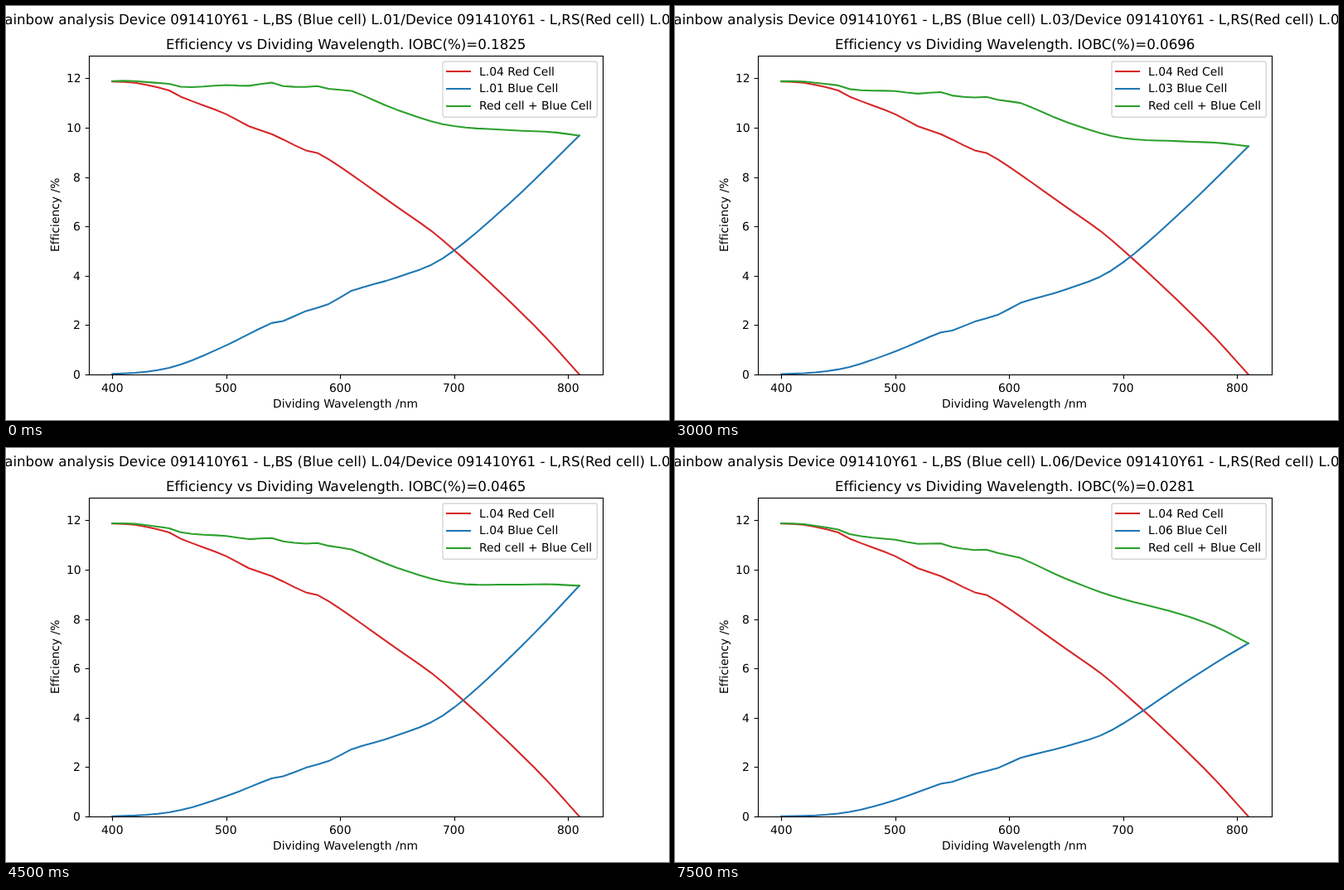
An HTML page with a canvas that plays this animation: 800x500 px, repeating every 8000 ms.

```html
<!DOCTYPE html>
<html lang="en">
<head>
<meta charset="utf-8">
<title>Efficiency vs Dividing Wavelength</title>
<style>
  html, body { margin: 0; width: 100%; height: 100%; overflow: hidden; background: #fff; }
  canvas { display: block; width: 800px; height: 500px; }
</style>
</head>
<body>
<canvas id="chart" width="800" height="500"></canvas>
<script>
const ctx = document.getElementById('chart').getContext('2d');
const LOOP = 8000, HOLD = 1500;
const AXES = { left: 100, right: 720, top: 60, bottom: 445 };
const RED = '#d62728', BLUE = '#1f77b4', GREEN = '#2ca02c';
const SMALL = 13.889, LARGE = 16.667;

// Wavelengths that are plotted, in nm.
const waves = Array.from({ length: 42 }, (_, i) => 400 + i * 10);

// Smooth curve through [x, y] points: cubic Hermite with secant slopes.
function spline(points) {
  const slopes = points.map((_, i) => {
    const [x0, y0] = points[Math.max(i - 1, 0)];
    const [x1, y1] = points[Math.min(i + 1, points.length - 1)];
    return (y1 - y0) / (x1 - x0);
  });
  return x => {
    const next = points.findIndex(p => p[0] >= x);
    const i = Math.max(next - 1, 0);
    const [x0, y0] = points[i], [x1, y1] = points[i + 1];
    const h = x1 - x0, k = (x - x0) / h, r = 1 - k;
    return y0 * r * r * (1 + 2 * k) + y1 * k * k * (1 + 2 * r)
      + h * k * r * (slopes[i] * r - slopes[i + 1] * k);
  };
}

// Efficiency in % at the bends of the red curve.
const redAt = spline([
  [400, 11.87], [420, 11.82], [450, 11.51], [460, 11.26], [500, 10.55], [520, 10.06],
  [540, 9.74], [570, 9.08], [580, 8.98], [600, 8.42], [650, 6.79], [680, 5.82],
  [700, 5.04], [740, 3.35], [780, 1.53], [810, 0]
]);

// Bends of the first blue cell; the others are scaled from it.
const blueAt = spline([
  [400, 0.02], [430, 0.11], [460, 0.4], [500, 1.18], [540, 2.085], [550, 2.165],
  [570, 2.57], [590, 2.855], [610, 3.39], [620, 3.535], [650, 3.935], [690, 4.7],
  [750, 6.99], [810, 9.68]
]);

const ratioWaves = [400, 530, 690, 750, 810];
const cells = [
  { iobc: '0.1825', ratios: [1, 1, 1, 1, 1] },
  { iobc: '0.1710', ratios: [0.91, 0.935, 0.969, 0.975, 0.981] },
  { iobc: '0.0696', ratios: [0.72, 0.811, 0.898, 0.936, 0.955] },
  { iobc: '0.0465', ratios: [0.56, 0.73, 0.869, 0.928, 0.966] },
  { iobc: '0.0443', ratios: [0.42, 0.685, 0.853, 0.927, 0.96] },
  { iobc: '0.0281', ratios: [0.3, 0.62, 0.744, 0.758, 0.725] }
];

const red = waves.map(redAt);
cells.forEach((cell, i) => {
  const ratioAt = spline(cell.ratios.map((r, j) => [ratioWaves[j], r]));
  cell.label = 'L.0' + (i + 1);
  cell.blue = waves.map(nm => blueAt(nm) * ratioAt(nm));
  cell.sum = cell.blue.map((v, j) => v + red[j]);
});

const xOf = nm => 128.18 + (nm - 400) * 563.636 / 410;
const yOf = value => AXES.bottom - value * 29.8;

// align: 0 = left, 0.5 = centre, 1 = right; the text starts on a whole pixel.
function text(str, x, y, size = SMALL, align = 0.5) {
  ctx.font = size + 'px "DejaVu Sans", sans-serif';
  ctx.fillStyle = '#000';
  ctx.fillText(str, Math.round(x - ctx.measureText(str).width * align), y);
}

function line(points, color, width) {
  ctx.beginPath();
  points.forEach(([x, y]) => ctx.lineTo(x, y));
  ctx.strokeStyle = color;
  ctx.lineWidth = width;
  ctx.stroke();
}

function curve(values, color) {
  line(values.map((v, i) => [xOf(waves[i]), yOf(v)]), color, 2.083);
}

function drawCurves(cell) {
  const { left, right, top, bottom } = AXES;
  ctx.save();
  ctx.beginPath();
  ctx.rect(left, top, right - left, bottom - top);
  ctx.clip();
  ctx.lineCap = 'square';
  ctx.lineJoin = 'round';
  curve(red, RED);
  curve(cell.blue, BLUE);
  curve(cell.sum, GREEN);
  ctx.restore();
}

function drawAxes() {
  const { left, right, top, bottom } = AXES;
  ctx.lineCap = 'butt';
  for (let nm = 400; nm <= 800; nm += 100) {
    const x = Math.round(xOf(nm)) + 0.5;
    line([[x, bottom + 0.5], [x, bottom + 5.4]], '#000', 1.111);
    text(nm, xOf(nm), 466);
  }
  for (let v = 0; v <= 12; v += 2) {
    const y = Math.round(yOf(v)) + 0.5;
    line([[left + 0.5, y], [left - 4.4, y]], '#000', 1.111);
    text(v, 90.3, Math.round(yOf(v) + 5), SMALL, 1);
  }
  ctx.strokeStyle = '#000';
  ctx.lineWidth = 1.111;
  ctx.strokeRect(left + 0.5, top + 0.5, right - left, bottom - top);

  text('Dividing Wavelength /nm', 410, 485);
  ctx.save();
  ctx.translate(64, 252);
  ctx.rotate(-Math.PI / 2);
  text('Efficiency /%', -0.5, 0);
  ctx.restore();
}

function drawLegend(cell) {
  ctx.beginPath();
  ctx.roundRect(527, 67, 186.3, 67.2, 2.8);
  ctx.fillStyle = '#fff';
  ctx.fill();
  ctx.strokeStyle = '#d6d6d6';
  ctx.lineWidth = 1.389;
  ctx.stroke();
  ctx.lineCap = 'square';
  [[RED, 'L.04 Red Cell'], [BLUE, cell.label + ' Blue Cell'], [GREEN, 'Red cell + Blue Cell']]
    .forEach(([color, label], i) => {
      const y = 79 + i * 21;
      line([[532, y], [560, y]], color, 2.083);
      text(label, 571, Math.floor(84.3 + i * 20.6), SMALL, 0);
    });
}

function draw(now) {
  const cell = cells[Math.floor((now % LOOP) / HOLD)];
  ctx.fillStyle = '#fff';
  ctx.fillRect(0, 0, 800, 500);
  drawCurves(cell);
  drawAxes();
  drawLegend(cell);
  text(`Rainbow analysis Device 091410Y61 - L,BS (Blue cell) ${cell.label}/Device 091410Y61 - L,RS(Red cell) L.04`,
    400, 22, LARGE);
  text(`Efficiency vs Dividing Wavelength. IOBC(%)=${cell.iobc}`, 410, 52, LARGE);
}

ctx.textRendering = 'geometricPrecision';
ctx.letterSpacing = '0.001px'; // keeps "ffi" as separate letters
const start = performance.now();
function tick() {
  draw(performance.now() - start);
  requestAnimationFrame(tick);
}
tick();
</script>
</body>
</html>
```
